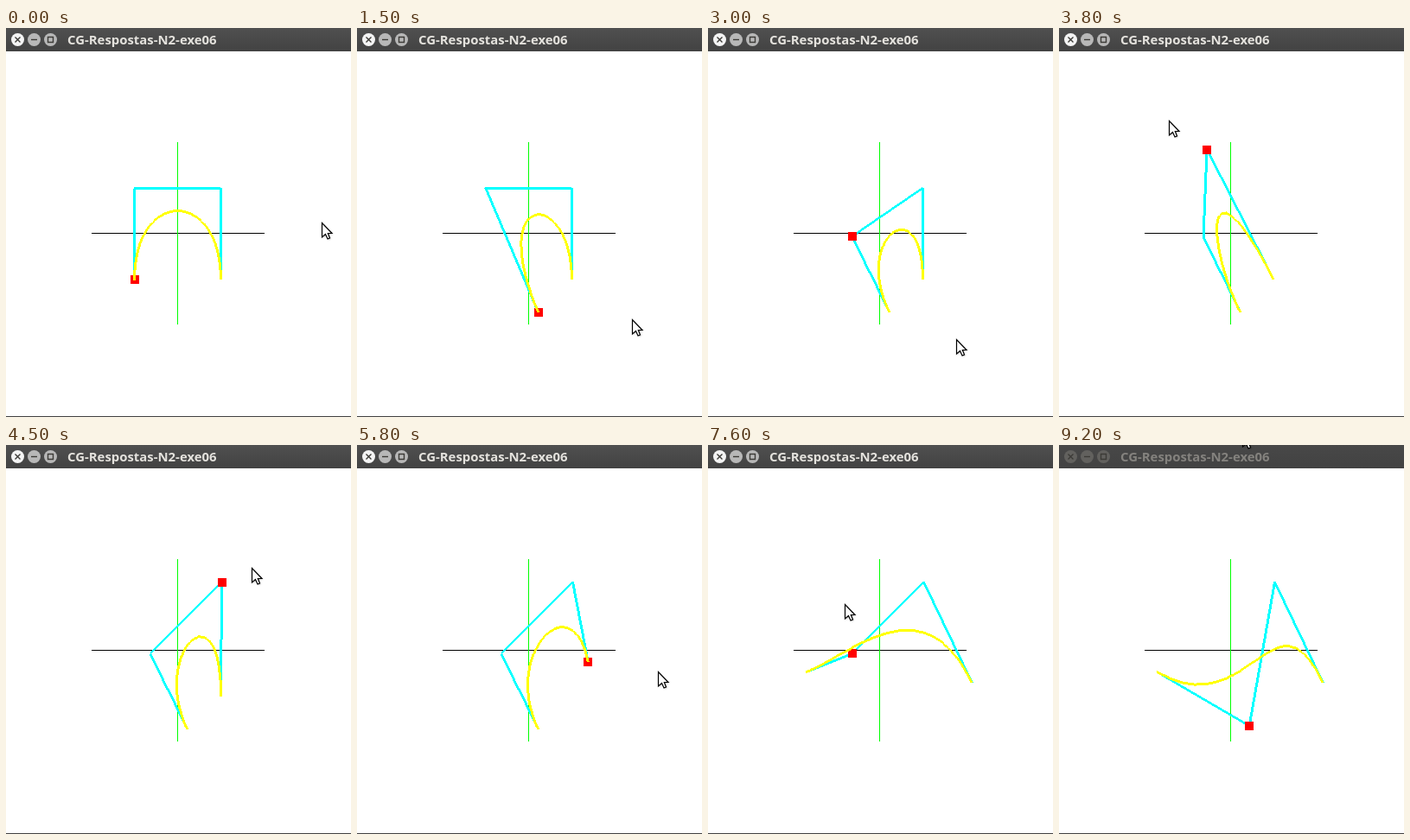
These frames come from a looping animation (399x450 px, 9.4 s). An HTML page with a canvas:

```html
<!DOCTYPE html>
<html lang="pt">
<head>
<meta charset="utf-8">
<title>CG-Respostas-N2-exe06</title>
<style>
html, body { margin: 0; width: 100%; height: 100%; overflow: hidden; background: #fff; }
canvas { display: block; }
</style>
</head>
<body>
<canvas id="stage" width="399" height="450"></canvas>
<script>
const ctx = document.getElementById('stage').getContext('2d');
const LOOP = 9400, STEP = 100;

const home = [[149, 291], [149, 185], [249, 185], [249, 291]];
const scale = [0.5, 0.525];
const entry = [365, 225];

// Each gesture approaches its press position, then drags a point along a bowed path.
const drag = (point, from, to, press, drop, bow = [0, 0], lead = 300) =>
  ({ point, from, to, press, drop, bow, lead });
const gestures = [
  drag(0, 500, 900, [196, 265], [318, 337]),
  drag(1, 1800, 3000, [250, 253], [287, 360], [-158, -97]),
  drag(2, 3400, 4500, [282, 192], [284, 142], [-171, -73]),
  drag(3, 4900, 5100, [284, 270], [224, 254]),
  drag(3, 5300, 6100, [250, 322], [424, 308], [-12, -55], 200),
  drag(0, 6500, 7300, [262, 325], [70, 199]),
  drag(1, 7600, 8200, [158, 184], [264, 344]),
  drag(1, 9200, 9200, [212, -15], [212, -15], [0, 0], 700)
];
const leaveTime = gestures[gestures.length - 1].from;

const clamp01 = k => Math.max(0, Math.min(1, k));
const mix = (a, b, k) => a.map((v, i) => v + (b[i] - v) * k);

function dragAt(g, t) {
  const k = clamp01((t - g.from) / (g.to - g.from || 1));
  return mix(g.press, g.drop, k).map((v, i) => v + g.bow[i] * Math.sin(Math.PI * k));
}

function sceneAt(t) {
  const points = home.map(p => [...p]);
  let pointer = entry, picked = 0;
  for (const g of gestures) {
    const approach = clamp01((t - g.from + g.lead) / g.lead);
    if (approach === 0) break;
    picked = g.point;
    pointer = approach < 1 ? mix(pointer, g.press, approach) : dragAt(g, t);
    if (approach === 1) {
      points[picked] = points[picked].map((v, i) => v + (pointer[i] - g.press[i]) * scale[i]);
    }
  }
  return { points, picked, pointer: pointer.map(Math.round) };
}

function rect(color, x, y, w, h) {
  ctx.fillStyle = color;
  ctx.fillRect(x, y, w, h);
}

// Aliased line, three pixels across its minor axis
function line(color, [x0, y0], [x1, y1]) {
  const dx = x1 - x0, dy = y1 - y0;
  const flat = Math.abs(dx) > Math.abs(dy);
  const n = Math.max(1, Math.ceil(Math.max(Math.abs(dx), Math.abs(dy))));
  for (let i = 0; i < n; i++) {
    const x = Math.floor(x0 + dx * i / n - 0.5), y = Math.floor(y0 + dy * i / n);
    if (flat) rect(color, x, y - 1, 1, 3);
    else rect(color, x - 1, y, 3, 1);
  }
}

function bezier(points, u) {
  while (points.length > 1) {
    points = points.slice(1).map((p, i) => mix(points[i], p, u));
  }
  return points[0];
}

function titleBar(active) {
  const shade = ctx.createLinearGradient(0, 0, 0, 27);
  shade.addColorStop(0, active ? '#505050' : '#484848');
  shade.addColorStop(1, '#424242');
  rect(shade, 0, 0, 399, 27);
  const glyphs = ['M-3-3l6 6m0-6l-6 6', 'M-3.5 0h7', 'M-3-3h6v6h-6z'];
  ctx.strokeStyle = '#3c3b37';
  ctx.lineWidth = 1.4;
  glyphs.forEach((d, i) => {
    ctx.save();
    ctx.translate(13.5 + 19 * i, 13.5);
    ctx.fillStyle = active ? (i ? '#b8b8b8' : '#f4f4f4') : '#62615e';
    ctx.beginPath();
    ctx.arc(0, 0, 7.5, 0, 2 * Math.PI);
    ctx.fill();
    ctx.stroke(new Path2D(d));
    ctx.restore();
  });
  ctx.font = 'bold 14.9px "Open Sans", sans-serif';
  ctx.fillStyle = active ? '#e4e2dd' : '#84827e';
  ctx.fillText('CG-Respostas-N2-exe06', 71, 19);
}

function arrow([x, y]) {
  const shape = new Path2D('M0 0V16.5L4 13L6.5 18.5L9 17.5L6.8 12H11.5Z');
  ctx.save();
  ctx.translate(x + 0.5, y + 0.5);
  ctx.strokeStyle = '#000';
  ctx.lineWidth = 1.2;
  ctx.shadowColor = 'rgba(0,0,0,.3)';
  ctx.shadowBlur = 2;
  ctx.shadowOffsetX = ctx.shadowOffsetY = 1;
  ctx.fillStyle = '#fff';
  ctx.fill(shape);
  ctx.shadowColor = 'transparent';
  ctx.stroke(shape);
  ctx.restore();
}

function draw(t) {
  const { points, picked, pointer } = sceneAt(t);
  rect('#fff', 0, 0, 399, 450);
  rect('#000', 99, 237, 200, 1);
  rect('#0f0', 198, 132, 1, 211);
  for (let i = 0; i < 3; i++) line('#0ff', points[i], points[i + 1]);
  const [x, y] = points[picked];
  rect('#f00', Math.floor(x) - 5, Math.round(y) - 5, 10, 10);
  for (let i = 0; i < 20; i++) line('#ff0', bezier(points, i / 20), bezier(points, (i + 1) / 20));
  rect('#404040', 0, 449, 399, 1);
  titleBar(t < leaveTime);
  arrow(pointer);
}

const start = performance.now();
function tick() {
  const t = (performance.now() - start) % LOOP;
  draw(Math.floor(t / STEP) * STEP);
  requestAnimationFrame(tick);
}
tick();
</script>
</body>
</html>
```
